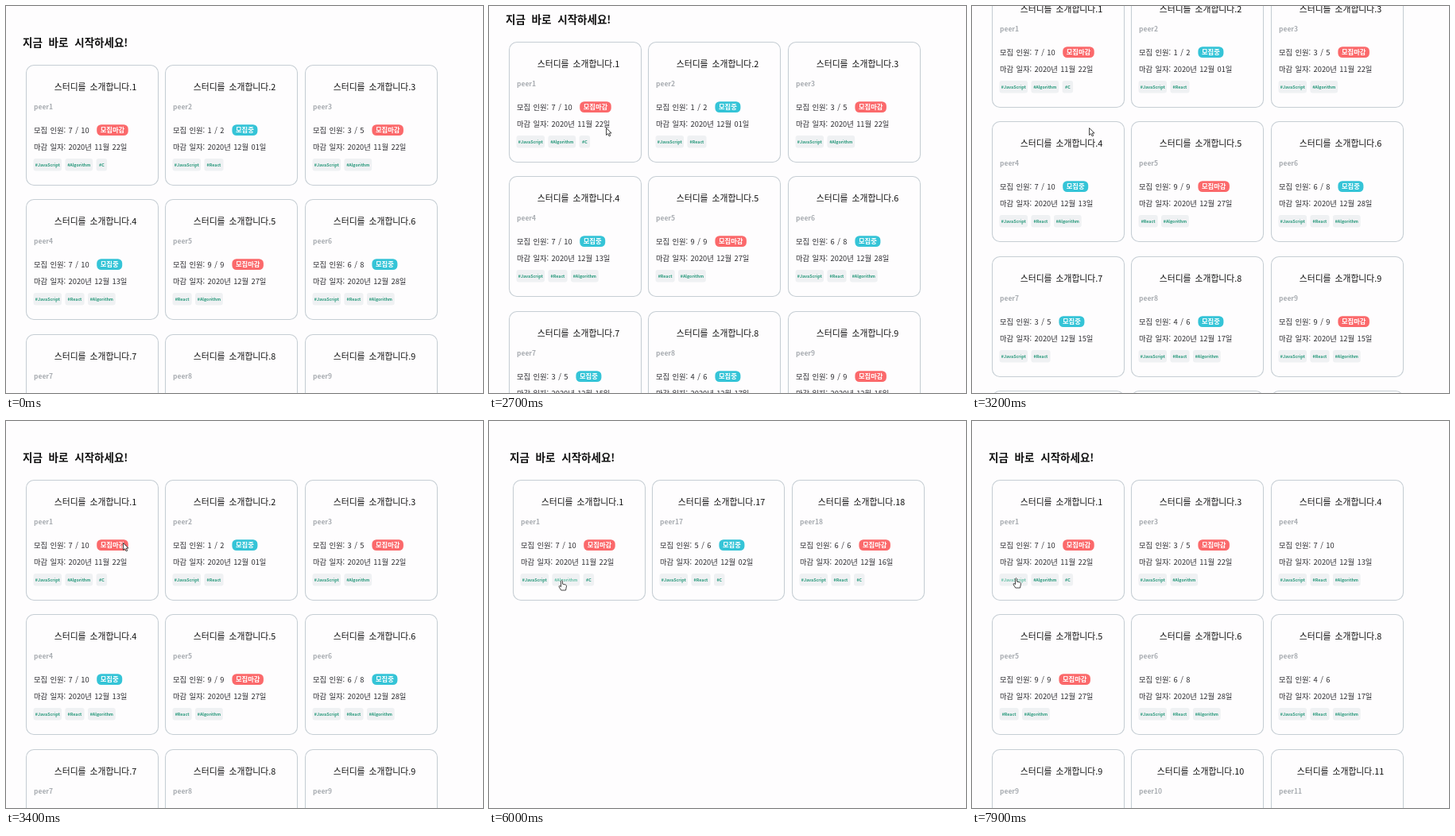
An HTML page for the animation above (8000 ms loop, 600x487 px).

```html
<!DOCTYPE html>
<html lang="ko">
<head>
<meta charset="utf-8">
<style>
  html, body { margin: 0; width: 100%; height: 100%; overflow: hidden; background: #fefdfe; }
  svg { display: block; width: 100%; height: 100%; font-family: 'Noto Sans CJK KR', 'Noto Sans CJK', 'Noto Sans', sans-serif; }
  .heading { font-size: 13.5px; font-weight: 700; word-spacing: 4px; fill: #111; }
  .card { fill: none; stroke: #c6ced4; stroke-width: 1.1; }
  .title { font-size: 10.8px; font-weight: 500; word-spacing: 2px; fill: #111; text-anchor: middle; }
  .member { font-size: 8.5px; font-weight: 700; fill: #a9adb2; }
  .info { font-size: 9.3px; word-spacing: .8px; fill: #2c2c30; }
  .badge text { font-size: 8.3px; font-weight: 900; fill: #fff; text-anchor: middle; }
  .tag rect { fill: #eff1f3; }
  .tag text { font-size: 5.3px; font-weight: 700; fill: #26987a; text-anchor: middle; }
  .tag.hover text { fill: #63bfa5; }
  .cursor { fill: #fff; stroke: #333; stroke-width: .9; stroke-linejoin: round; }
</style>
</head>
<body>
<svg viewBox="0 0 600 487">
  <g id="page"></g>
  <path id="arrow" class="cursor" d="M0 0V9L2.1 7.1L3.7 10.4L5.2 9.7L3.7 6.5H6.5Z"/>
  <path id="hand" class="cursor" d="M-1 1Q0-.7 1 1V4.6L5 5.6Q6 6 6 7.3L5 12.5H-.8L-3.4 8.3Q-3.7 6.8-2.4 7L-1 8.2Z"/>
</svg>
<script>
const LOOP = 8000, STEP = 100, MOVE = 400;
const $ = id => document.getElementById(id);

// number: seats, closing date, tags
const studies = {
  1: '7 / 10, 11월 22일, JAC',
  2: '1 / 2, 12월 01일, JR',
  3: '3 / 5, 11월 22일, JA',
  4: '7 / 10, 12월 13일, JRA',
  5: '9 / 9, 12월 27일, RA',
  6: '6 / 8, 12월 28일, JRA',
  7: '3 / 5, 12월 15일, JR',
  8: '4 / 6, 12월 17일, JRA',
  9: '9 / 9, 12월 15일, JRA',
  10: '3 / 4, 12월 20일, JRA',
  11: '1 / 2, 12월 18일, JA',
  12: '7 / 8, 12월 23일, JR',
  17: '5 / 6, 12월 02일, JRC',
  18: '6 / 6, 12월 16일, JRC'
};
const tagNames = { J: 'JavaScript', A: 'Algorithm', R: 'React', C: 'C' };
const tagWidth = name => Math.min(35.5, 10.9 + 2.65 * name.length);

function tagRow(letters) {
  let x = 9.5;
  return [...letters].map(letter => {
    const name = tagNames[letter], width = tagWidth(name);
    const svg = `<g class="tag ${letter}"><rect x="${x}" y="118" width="${width}" height="15.5" rx="3"/>
      <text x="${x + width / 2}" y="127.8">#${name}</text></g>`;
    x += width + 4.4;
    return svg;
  }).join('');
}

// Applications close when the seats are full or the date is past.
function badge(seats, date) {
  const [taken, total] = seats.split(' / ');
  const open = taken !== total && !date.startsWith('11월');
  const x = 74.8 + 4.8 * (taken + total).length, width = open ? 32 : 39.5;
  return `<g class="badge ${open ? 'open' : ''}">
    <rect x="${x}" y="75.2" width="${width}" height="13.8" rx="5.5" fill="${open ? '#35c4d7' : '#fb696b'}"/>
    <text x="${x + width / 2}" y="85">${open ? '모집중' : '모집마감'}</text></g>`;
}

function card(number, index) {
  const [seats, date, tags] = studies[number].split(', ');
  const x = 25 + Math.round(175.3 * (index % 3));
  const y = 74 + Math.round(169.4 * Math.floor(index / 3));
  return `<g transform="translate(${x} ${y})">
    <rect class="card" x=".5" y=".5" width="166" height="151" rx="9.5"/>
    <text class="title" x="87.5" y="32">스터디를 소개합니다.${number}</text>
    <text class="member" x="10" y="56.3">peer${number}</text>
    <text class="info" x="10" y="85.5">모집 인원: ${seats}</text>
    ${badge(seats, date)}
    <text class="info" x="10" y="107">마감 일자: 2020년 ${date}</text>
    ${tagRow(tags)}</g>`;
}

// The short list has no scrollbar, so its content sits 5px further right.
const lists = [
  { from: 0, filter: '', shift: 0 },
  { from: 5600, filter: 'C', shift: 5 },
  { from: 6700, filter: 'A', shift: 0 }
];
$('page').innerHTML = lists.map(({ filter, shift }) => {
  const numbers = Object.keys(studies).filter(number => studies[number].includes(filter));
  return `<g class="list" transform="translate(${shift} 0)">
    <text class="heading" x="21" y="51">지금 바로 시작하세요!</text>
    ${numbers.slice(0, 12).map(card).join('')}</g>`;
}).join('');
const listNodes = [...document.querySelectorAll('.list')];
const openBadges = [...document.querySelectorAll('.badge.open')];

// Where the pointer rests, when it arrives, and the tag it touches there.
const stops = [
  { at: 1700, x: 578, y: 215 },
  { at: 2500, x: 147, y: 153 },
  { at: 4900, x: 131, y: 198 },
  { at: 5000, x: 122, y: 198, tag: 'C' },
  { at: 6000, x: 91, y: 200, tag: 'A' },
  { at: 7900, x: 55, y: 197, tag: 'J' }
];

function pointerAt(time) {
  const index = stops.findLastIndex(stop => time >= stop.at);
  if (index < 0) return null;
  const here = stops[index], next = stops[index + 1];
  if (!next) return here;
  const part = 1 - (next.at - time) / Math.min(MOVE, next.at - here.at);
  if (part <= 0) return here;
  return { x: here.x + (next.x - here.x) * part, y: here.y + (next.y - here.y) * part };
}

function scrollAt(time) {
  const part = Math.min(1, Math.max(0, (time - 2600) / 800));
  return Math.round(196 * Math.sin(Math.PI * part) ** 2);
}

const blinkedOff = time => (time + 980) % 1480 < 300;

function draw(time) {
  const current = lists.findLastIndex(list => time >= list.from);
  listNodes.forEach((node, i) => node.style.display = i === current ? '' : 'none');
  $('page').setAttribute('transform', `translate(0 ${-scrollAt(time)})`);
  openBadges.forEach(node => node.style.opacity = blinkedOff(time) ? 0 : 1);

  const pointer = pointerAt(time);
  document.querySelectorAll('.hover').forEach(node => node.classList.remove('hover'));
  if (pointer?.tag) listNodes[current].querySelector('.tag.' + pointer.tag).classList.add('hover');

  const shape = pointer && (pointer.tag ? 'hand' : 'arrow');
  for (const id of ['arrow', 'hand']) $(id).style.display = id === shape ? '' : 'none';
  if (pointer) {
    $(shape).setAttribute('transform', `translate(${Math.round(pointer.x) + .5} ${Math.round(pointer.y) + .5})`);
  }
}

function tick() {
  draw(Math.floor(performance.now() % LOOP / STEP) * STEP);
  requestAnimationFrame(tick);
}
tick();
</script>
</body>
</html>
```
